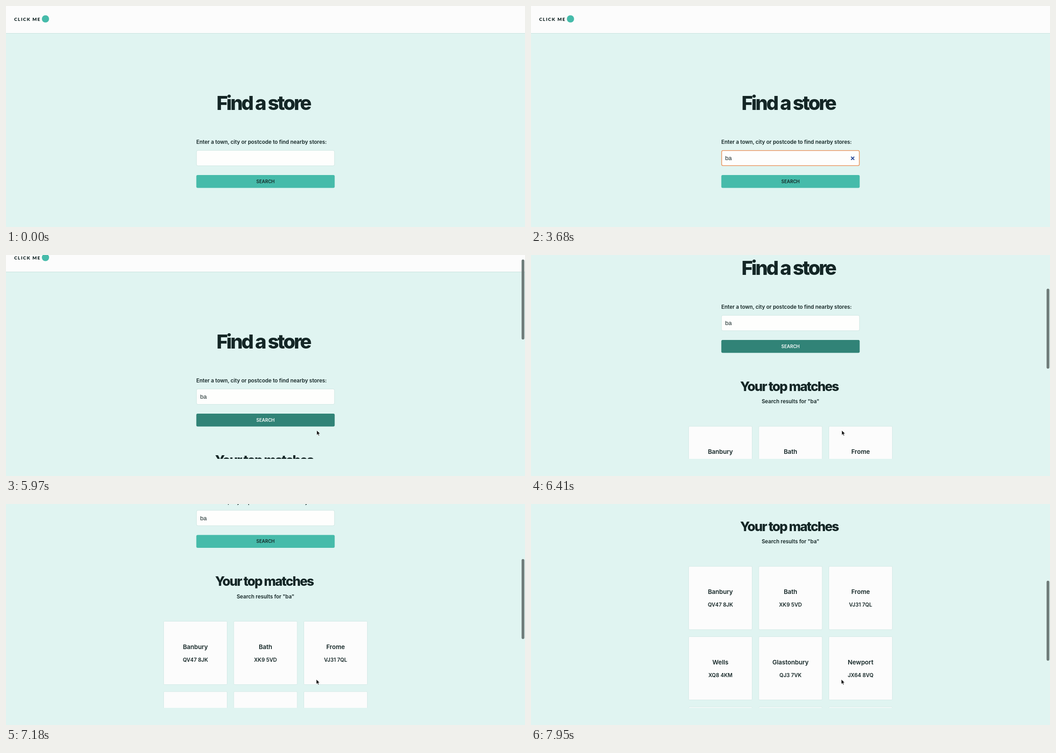
An HTML page for the animation above (8000 ms loop, 1144 px wide and 489 px high).

```html
<!DOCTYPE html>
<html lang="en">
<head>
<meta charset="utf-8">
<title>Find a store</title>
<style>
  html, body { margin: 0; width: 100%; height: 100%; overflow: hidden; background: #e0f4f1; }
  svg { display: block; width: 1144px; height: 489px; }
  text { font-family: Inter, sans-serif; font-weight: 600; fill: #142626; white-space: pre; }
  .mid { text-anchor: middle; }
  .title { font-weight: 800; }
  .brand { font: 900 10px Lato, sans-serif; letter-spacing: 1.55px; }
  .label { font-size: 11.5px; }
  .name { font-size: 13.5px; }
  .typed { font: 13px "Liberation Sans", Arial, sans-serif; }
  .card { fill: #fcfcfc; stroke: #d2e9e6; }
</style>
</head>
<body>
<svg viewBox="0 0 1144 489">
  <defs><clipPath id="view"><rect width="1144" height="451"/></clipPath></defs>
  <g clip-path="url(#view)">
    <g id="page">
      <rect width="1144" height="60" fill="#fcfcfc"/>
      <rect y="60" width="1144" height="1" fill="#c8e1dd"/>
      <text class="brand" x="18" y="33">CLICK ME</text>
      <circle cx="87" cy="28.5" r="8" fill="#46bbaa"/>
      <text class="title" x="464" y="230" font-size="43" letter-spacing="-3.3">Find a store</text>
      <text class="label" x="419.5" y="305">Enter a town, city or postcode to find nearby stores:</text>
      <rect id="field" fill="#fefefd" rx="3"/>
      <text id="typed" class="typed" x="428" y="341"></text>
      <rect id="caret" y="329" width="1" height="15" fill="#111"/>
      <path id="clear" d="M705.5 333.5l7 7m0-7l-7 7" stroke="#31509c" stroke-width="2.2"/>
      <rect id="button" x="419.5" y="374" width="305" height="28.5" rx="3"/>
      <text id="search" class="mid" x="572" y="391.5" font-size="9.8">SEARCH</text>
      <text class="title" x="461" y="486.5" font-size="28.5" letter-spacing="-1.9">Your top matches</text>
      <text class="label mid" x="572" y="514">Search results for "ba"</text>
      <g id="cards"></g>
    </g>
    <rect id="bar" x="1136.5" width="6" height="177" rx="3" fill="#6d7a78"/>
  </g>
  <path id="arrow" d="M0 0V10.5L2.4 8.3L4 12L5.8 11.2L4.2 7.6H7.6Z" fill="#111" stroke="#fff" stroke-width=".7"/>
  <path id="beam" d="M-2.5-5Q0-5 0-3.5Q0-5 2.5-5M0-4V4M-2.5 5Q0 5 0 3.5Q0 5 2.5 5M-1.5 1H1.5" fill="none" stroke="#444"/>
</svg>
<script>
const LOOP = 8000;
const $ = id => document.getElementById(id);

const stores = [
  ['Banbury', 'QV47 8JK'], ['Bath', 'XK9 5VD'], ['Frome', 'VJ31 7QL'],
  ['Wells', 'XQ8 4KM'], ['Glastonbury', 'QJ3 7VK'], ['Newport', 'JX64 8VQ'],
  ['', ''], ['', ''], ['', '']
];
$('cards').innerHTML = stores.map(([name, code], i) => {
  const x = 347.5 + 154.5 * (i % 3), y = 565 + 155.5 * Math.floor(i / 3);
  return `<rect class="card" x="${x}" y="${y}" width="140" height="140" rx="2"/>
    <text class="name mid" x="${x + 70}" y="${y + 61}">${name}</text>
    <text class="label mid" x="${x + 70}" y="${y + 89}">${code}</text>`;
}).join('');

// Each row: start time, then the values held until the next row.
const pointer = [
  [0], [500, 725, 36], [800, 722, 110], [890, 712, 260], [980, 696, 385], [1080, 676, 400],
  [1220, 652, 372], [1310, 640, 347], [1390, 635, 340], [3590],
  [4370, 642, 341], [4460, 676, 348], [4560, 730, 357], [4650, 772, 362], [4750, 787, 364],
  [5040, 766, 365], [5140, 726, 366], [5260, 704, 376], [5370, 690, 386], [5530, 685, 388],
  [7180, 684, 388]
];
const hover = [[0, 0], [980, .5], [1080, 1], [1220, .5], [1310, 0], [5370, .5], [5530, 1], [7180, 0]];
const focus = [[0, 'none'], [1470, 'pressed'], [1650, 'active'], [4940, 'none']];
const typing = [[0, ''], [2710, 'b'], [3190, 'ba']];
const caret = [[0, 0], [1470, 428], [2200, 0], [2710, 435], [3190, 442], [3680, 0], [4180, 442], [4690, 0]];
const scroll = [
  [0, 0], [5880, 7], [5970, 23], [6050, 47], [6150, 84], [6290, 140], [6410, 186], [6520, 222],
  [6600, 245], [6680, 263], [6760, 277], [6850, 289], [6930, 297], [7180, 305.5], [7290, 335],
  [7370, 361], [7450, 384], [7530, 403], [7610, 416], [7690, 424], [7950, 427]
];
const borders = { none: ['#cfe7e3', 1], pressed: ['#101818', 2], active: ['#e9955f', 1.6] };

const at = (rows, t) => rows.findLast(row => row[0] <= t).slice(1);
const mix = (a, b, k) => `rgb(${a.map((v, i) => Math.round(v + (b[i] - v) * k))})`;
const show = (id, on) => $(id).setAttribute('visibility', on ? 'visible' : 'hidden');
const set = (id, attrs) => { for (const key in attrs) $(id).setAttribute(key, attrs[key]); };

function draw(t) {
  const [y] = at(scroll, t);
  set('page', { transform: `translate(0 ${-y})` });
  set('bar', { y: 1 + .395 * y });
  show('bar', y > 0);

  const [state] = at(focus, t), [stroke, width] = borders[state];
  const inset = width / 2;
  set('field', {
    x: 419.5 + inset, y: 319 + inset, width: 305 - width, height: 35 - width,
    stroke, 'stroke-width': width
  });
  const [text] = at(typing, t), [caretX] = at(caret, t);
  $('typed').textContent = text;
  set('caret', { x: caretX });
  show('caret', caretX);
  show('clear', text && state === 'active');

  const [k] = at(hover, t);
  set('button', { fill: mix([70, 187, 170], [49, 131, 119], k) });
  $('search').style.fill = mix([20, 38, 38], [255, 255, 255], k);

  const [px, py] = at(pointer, t);
  const inField = px > 420 && px < 724 && py > 320 && py < 354;
  show('arrow', px && !inField);
  show('beam', px && inField);
  if (px) for (const id of ['arrow', 'beam']) set(id, { transform: `translate(${px} ${py})` });
}

const start = performance.now();
function tick() {
  draw((performance.now() - start) % LOOP);
  requestAnimationFrame(tick);
}
tick();
</script>
</body>
</html>
```
